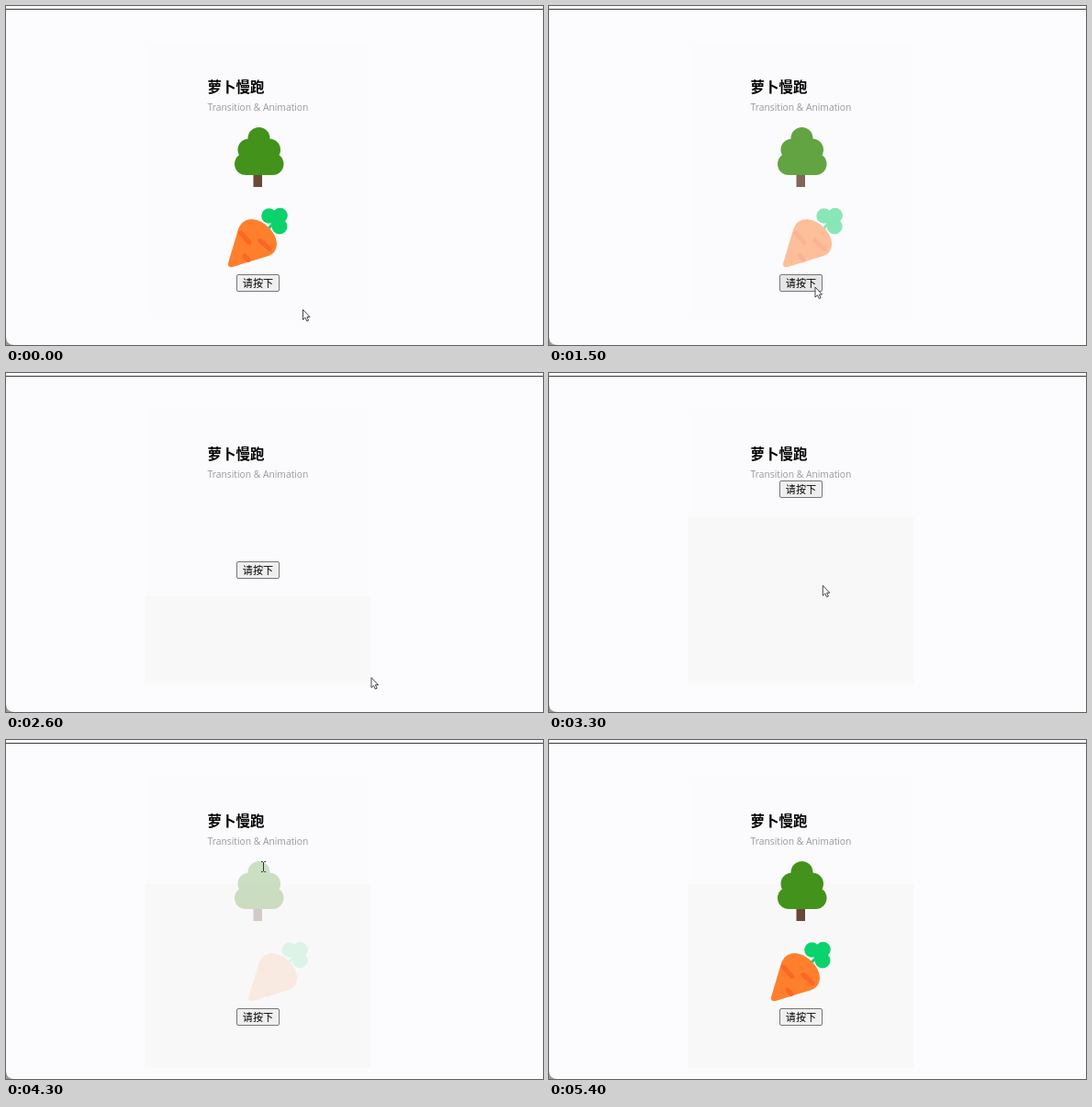
Recreate the animation shown at these times as an HTML page. Size 585 by 369 pixels, loop 7.1 s.

```html
<!DOCTYPE html>
<html lang="zh">
<head>
<meta charset="utf-8">
<style>
  html, body { margin: 0; width: 100%; height: 100%; overflow: hidden; background: #fcfbfe; }
  svg { display: block; }
  text { font-family: "Noto Sans CJK SC", "Noto Sans CJK", sans-serif; }
  .sub { font: 10.3px "Open Sans", "Noto Sans", sans-serif; }
</style>
</head>
<body>
<svg width="585" height="369" viewBox="0 0 585 369">
  <rect x="154" y="40" width="241" height="295" fill="#fbfafc"/>
  <rect id="shade" x="151" width="246"/>
  <rect y="3" width="585" height="1" fill="#3a3a3c"/>
  <path d="M0 361Q1 369 9 369H0Z" fill="#999"/>

  <text x="219.5" y="93.5" font-size="15.5" font-weight="700">萝卜慢跑</text>
  <text class="sub" x="219.5" y="114" fill="#999">Transition &amp; Animation</text>

  <g id="tree">
    <rect x="269.5" y="184" width="9.5" height="13" fill="#684838"/>
    <g fill="#43921c">
      <circle cx="275.5" cy="144" r="12"/>
      <circle cx="264.5" cy="156.5" r="12"/>
      <circle cx="287" cy="156.5" r="12"/>
      <rect x="264" y="146" width="23" height="24"/>
      <rect x="249" y="160" width="53.5" height="24" rx="12"/>
    </g>
  </g>

  <g id="carrot">
    <g fill="#0cd26b">
      <path d="M283 245L292 236" stroke="#0cd26b" stroke-width="3"/>
      <circle cx="286.5" cy="228.5" r="8.3"/>
      <circle cx="298.5" cy="228" r="8.3"/>
      <circle cx="298" cy="240" r="8.5"/>
      <circle cx="293" cy="234" r="5"/>
    </g>
    <path d="M242 280L253 243Q257 232 268 232Q279 233 287 242Q295 250 295 260Q294 269 286 272L247 284Q241 285 242 280Z" fill="#ff7f2d"/>
    <path d="M255.5 247L265 257.5M277 255.5L287 264.5M260 272L264 276.5" stroke="#fb6724" stroke-width="5" stroke-linecap="round"/>
  </g>

  <g id="button">
    <rect id="face" x="251.5" y=".5" width="46" height="18" rx="1.5" stroke="#767676"/>
    <text x="257.8" y="14" font-size="11.1">请按下</text>
  </g>

  <path id="arrow" d="M.5 .5V11.5L3 9.2L4.8 13L6.6 12.2L4.9 8.5H8Z" fill="#fff" stroke="#333" stroke-width=".9"/>
  <path id="beam" d="M278 132.5H279.5L280.5 133.5L281.5 132.5H283M280.5 133V143M278 143.5H279.5L280.5 142.5L281.5 143.5H283" fill="none" stroke="#333"/>
</svg>
<script>
const LOOP = 7100, STEP = 100, SLIDE = 25;
const REMOVE_CARROT = 2100, REMOVE_TREE = 2900, RESTORE = 4300;
const $ = id => document.getElementById(id);

// Pointer moves: start, duration, x, y
const moves = [
  [600, 400, 289.5, 305.5],
  [1600, 200, 323, 329],
  [1800, 300, 397.5, 331],
  [2600, 1000, 295, 228],
  [3400, 600, 279, 131]
];

const part = (t, start, length) => Math.min(1, Math.max(0, (t - start) / length));
const easeOut = p => 1 - (1 - p) ** 3;
const easeInOut = p => (1 - Math.cos(Math.PI * p)) / 2;

function set(id, attrs) {
  for (const name in attrs) $(id).setAttribute(name, attrs[name]);
}
const show = (id, on) => set(id, { visibility: on ? "visible" : "hidden" });

function pointerAt(t) {
  let x = 323, y = 330;
  for (const [start, length, toX, toY] of moves) {
    const p = easeOut(part(t, start, length));
    x += (toX - x) * p;
    y += (toY - y) * p;
  }
  return `translate(${x} ${y})`;
}

function draw(ms) {
  const t = Math.floor(ms % LOOP / STEP) * STEP;

  const tree = 1 - easeInOut(part(t, 1200, 1100)) + easeOut(part(t, 4225, 800));
  const carrot = 1 - easeOut(part(t, 1280, 1000)) + easeOut(part(t, 4262, 1000));
  set("tree", { opacity: tree });
  set("carrot", { opacity: carrot, transform: `translate(${SLIDE * (1 - carrot)})` });

  // The button moves up as each item leaves the layout.
  const gone = t >= RESTORE ? 0 : (t >= REMOVE_CARROT) + (t >= REMOVE_TREE);
  const hover = t >= 900 && t < 1800 || t >= 4000 && t < RESTORE;
  set("button", { transform: `translate(0 ${Math.round(292 - 87.5 * gone)})` });
  set("face", { fill: hover ? "#e5e5e5" : "#efefef" });

  const top = gone === 1 ? 243 : 157;
  show("shade", t >= REMOVE_CARROT);
  set("shade", { y: top, height: (gone ? 338 : 357) - top, fill: gone ? "#f8f8f8" : "#f9f8f9" });

  show("arrow", t < RESTORE);
  show("beam", t >= RESTORE && t < RESTORE + 200);
  set("arrow", { transform: pointerAt(t) });
}

const start = performance.now();
(function frame() {
  draw(performance.now() - start);
  requestAnimationFrame(frame);
})();
</script>
</body>
</html>
```
